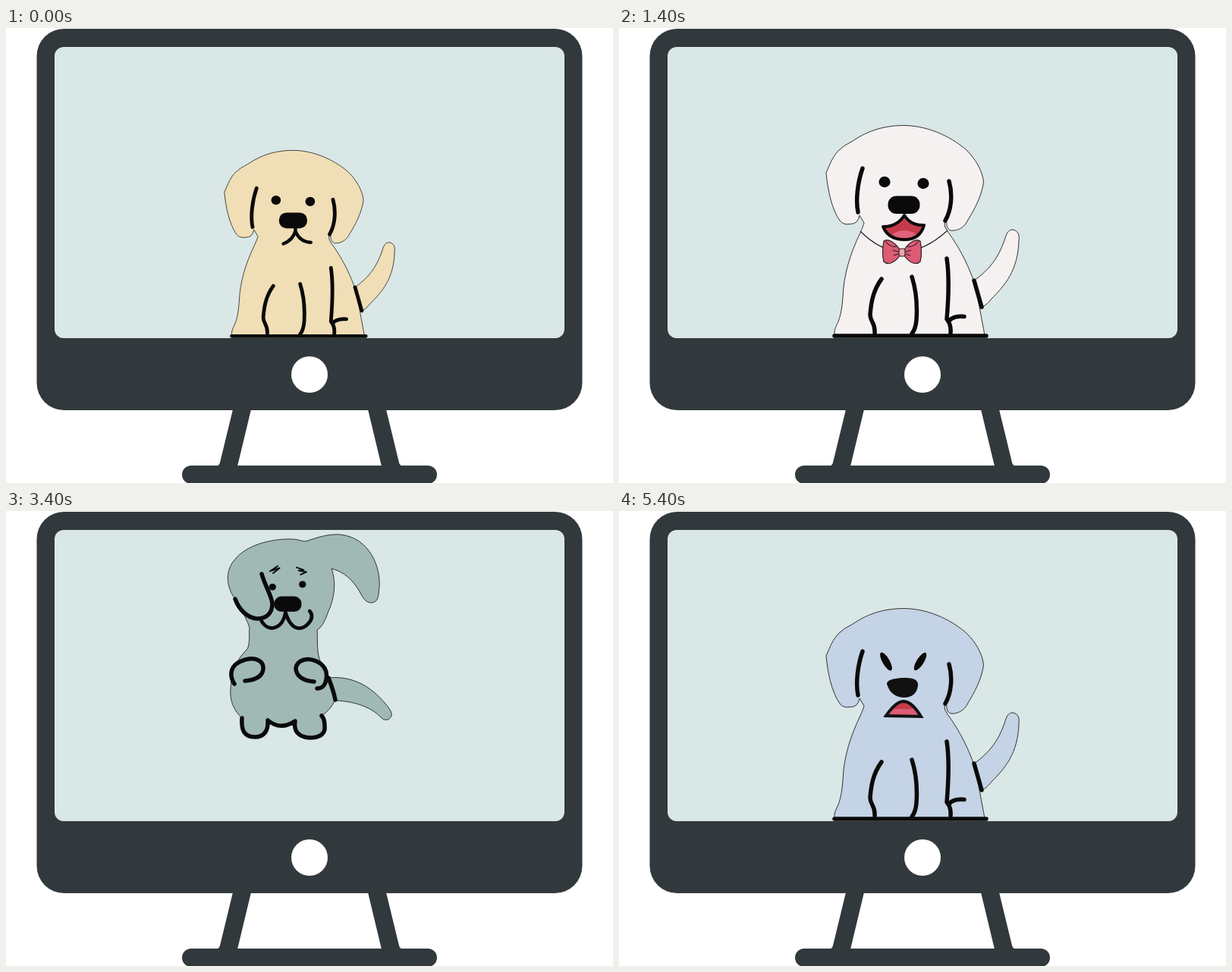
An HTML page for the animation above (5.6 s loop, 800 px wide and 600 px high).

```html
<!DOCTYPE html>
<html>
<head>
<meta charset="utf-8">
<title>Jumping puppies</title>
<style>
html, body { margin: 0; width: 100%; height: 100%; overflow: hidden; background: #fff; }
svg { display: block; width: 800px; height: 600px; }
.skin { stroke: #333; stroke-width: 1; }
.thin { fill: none; stroke: #222; stroke-width: 1.2; }
.thick { fill: none; stroke: #0a0a0a; stroke-width: 5.5; stroke-linecap: round; stroke-linejoin: round; }
</style>
</head>
<body>
<svg viewBox="0 0 800 600">
  <g fill="#32393c">
    <rect x="40.500" y="1" width="719" height="503" rx="36"/>
    <path d="M299 503H323L305 578H277Q281 577 282 573ZM501 503H477L495 578H523Q519 577 518 573Z"/>
    <rect x="232" y="577" width="336" height="24" rx="12"/>
  </g>
  <rect x="64" y="25" width="672" height="384" rx="12" fill="#d9e7e6"/>
  <circle cx="400" cy="457" r="24" fill="#fff"/>
  <g id="dog"></g>
</svg>
<script>
const poses = {
  sit: {
    body: 'M273 191C279 177 282 169 290 161Q296 155 308 149C330 134 352 128.500 376 128.500C412 129 442 147 458 161C470 173 479 188 480.500 203C478 222 468 240 460 253C455 264 445 268 437 267Q431 264 432 257L429 256Q428 262 433 268C452 294 462 318 468 335C474 360 478 385 482 405H284C283 390 292 395 295 355C296 325 305 297 318 270Q322 261 323 257L317 247Q315 259 304 258.500Q296 260 291 254C280 238 275 213 273 191Z',
    tail: 'M468 333C488 319 500 303 508 280C511 269 514 266 519 266C526 267 528 273 527 280C526 320 508 340 491 357Q484 366 478 368Z',
    lines: 'M321 185C314 205 312 228 315 243M435 202C440 220 438 240 430 254M346 331C334 347 332 365 331 378C331 388 338 388 337 402M386 328C393 350 393 370 392 385Q391 397 386 403M432 304C436 330 434 360 432 384Q438 391 437 402M434 387C440 380 448 380 455 380.500M468 333L478 368M284 406H484',
    collar: 'M318 268Q372 322 433 267',
    bow: [373, 296], face: [375, 233, 1], eyes: [[-25, -30], [26, -28]]
  },
  top: {
    body: 'M302 116C290 100 289 80 300 66C316 44 350 37 374 37C385 37 390 40 395 40C410 35 425 30 440 31C480 35 494 75 492 100C491 112 491 120 482 121C475 121 471 116 467 108C457 90 445 80 429 76C436 95 432 117 425 132Q418 153 410 157C411 170 409 188 415 200L425 220L434 249Q428 262 416 270C421 275 420 283 420 288C418 298 408 299 400 299C385 298 379 290 381 277Q362 290 345 276C346 290 340 298 328 298C313 298 310 288 311 273C297 260 295 245 296 235C297 215 300 200 318 182C322 175 320 160 321 154Q318 143 302 116Z',
    tail: 'M425 220C455 217 480 230 500 254C506 261 509 266 508 270C506 276 499 277 495 273C485 262 465 251 434 250Z',
    lines: 'M337 83C342 100 350 112 351 122C351 136 342 142 331 142C318 141 307 130 302 116M301 228C293 215 297 203 310 198C325 191 340 196 339 208C338 219 328 223 315 224M406 225C392 224 382 218 382 207C384 196 397 193 409 198C420 203 424 212 422 222C421 230 416 234 410 234M425 220Q432 238 434 249M416 270C421 275 420 283 420 288C418 298 408 299 400 299C385 298 379 290 381 277Q362 290 345 276C346 290 340 298 328 298C313 298 310 288 311 273',
    collar: 'M321 156Q365 204 411 157',
    bow: [366, 182], face: [371, 122.5, .86], eyes: [[-23, -30], [29, -24]]
  },
  fall: {
    body: 'M320 205C300 195 275 165 273 138C272 110 290 100 300 95C318 87 325 75 345 70C365 66 380 63 395 66C425 70 445 90 460 110C470 123 478 130 488 128C500 125 505 121 515 123C530 126 527 137 522 144C508 162 495 176 475 175Q460 174 447 166C446 185 440 198 434 206Q425 212 409 220L421 229L433 268Q430 280 424 282L420 291C430 291 437 298 433 310C428 322 410 320 396 310Q390 304 389 297C380 292 360 294 350 299Q348 316 337 321C322 326 306 319 307 305Q308 298 313 297C295 285 290 265 295 248Q303 222 321 215Z',
    tail: 'M422 238C455 235 475 233 490 219C497 211 504 212 507 217C508 225 495 240 480 252C465 262 450 267 433 267Z',
    lines: 'M319 138C312 150 313 165 319 178C325 190 322 200 320 205M429 142Q433 158 448 167M422 237Q429 250 433 268M391 270C386 285 386 300 396 310C410 320 428 322 433 310C437 298 430 289 413 291L424 281M349 273C352 290 353 312 337 321C322 326 306 319 307 305C307 297 315 295 323 296L314 285',
    collar: 'M314 223Q365 283 422 228',
    bow: [369, 255], face: [370, 173, 1], eyes: [[-27, -23], [32, -16]]
  }
};

const path = (d, attrs) => `<path d="${d}" ${attrs}/>`;
const ellipse = (x, y, rx, ry, turn = 0) =>
  `<ellipse rx="${rx}" ry="${ry}" transform="translate(${x} ${y}) rotate(${turn})"/>`;
const dots = (eyes, r) => eyes.map(([x, y]) => ellipse(x, y, r, r * .95)).join('');
const ink = w => `fill="none" stroke="#0a0a0a" stroke-width="${w}" stroke-linecap="round" stroke-linejoin="round"`;
const roundNose = '<rect x="-20.500" y="-11.500" width="42" height="23.500" rx="11"/>';

const faces = {
  calm: eyes => dots(eyes, 7.2) + roundNose +
    path('M-14 35Q0 30 4 16Q10 32 27 33M4 10V17', ink(5)),
  happy: eyes => dots(eyes, 7.6) + roundNose +
    path('M-27 29Q-8 29 1 14Q10 28 27 27Q22 46 1 46Q-20 46 -27 29Z', 'fill="#c43b49"') +
    path('M-15 39Q1 29 17 39Q10 45 1 45Q-9 45 -15 39Z', 'fill="#e0627c"') +
    path('M-27 29Q-8 29 1 14Q10 28 27 27Q22 46 1 46Q-20 46 -27 29Z', ink(4)),
  sad: () => dots([[-23, -26], [23, -30]], 5.5) + roundNose +
    path('M-40 26C-30 44 -8 40 -3 13C6 44 24 40 32 30C39 23 38 15 34 11', ink(5.5)) +
    path('M-27 -50L-15 -58L-24 -51L-12 -55L-22 -47M14 -56L25 -52L17 -51L29 -49L20 -45', ink(2.2)),
  angry: () => ellipse(-23, -34.5, 4.7, 13.5, -30) + ellipse(22, -34.5, 4.7, 13.5, 32) +
    path('M-22 -5Q-22 -12 0 -13Q20 -14 19 -3Q17 13 0 13Q-17 12 -22 -5Z', 'fill="#111"') +
    path('M-23 37Q-10 18 0 18Q11 18 23 38Z', 'fill="#c43b49"') +
    path('M-15 28H14L22 37H-22Z', 'fill="#dd5b74"') +
    path('M-23 37Q-10 18 0 18Q11 18 23 38Z', 'fill="none" stroke="#111" stroke-width="4"')
};

const bowHalf = path('M3 -4C10 -14 19 -19 24 -15Q27 0 24 12C18 18 8 12 3 4Z', 'fill="#dd5b74"') +
  path('M7 -8Q15 -6 22 -15M5 -1L12 -3M5 2L11 4', 'fill="none"');
const bow = ([x, y]) => `<g transform="translate(${x} ${y})" stroke="#222" stroke-width="1.200">
  ${bowHalf}<g transform="scale(-1 1)">${bowHalf}</g>
  <rect x="-4" y="-5" width="8" height="10" rx="2" fill="#eba3b0"/></g>`;

const dogs = [
  { skin: '#f0deb6', face: 'calm', size: .883, shift: [31, 1] },
  { skin: '#f5f1f1', face: 'happy', bow: true },
  { skin: '#a0b9b5', face: 'sad' },
  { skin: '#c4d3e5', face: 'angry' }
];

// Each step: pose, horizontal stretch, vertical stretch, drop
const jump = [
  ['sit', 1, 1, 0],
  ['sit', 1.13, .85, 0],
  ['sit', .92, 1.1, -30],
  ['top', 1, 1, 0],
  ['fall', 1, 1, 0],
  ['fall', 1, 1, 80],
  ['sit', 1, 1, 0]
];

function drawDog({ skin, face, bow: hasBow, size = 1, shift = [0, 0] }, [name, sx, sy, drop]) {
  const pose = poses[name], [x, y, scale] = pose.face;
  const place = name === 'sit'
    ? `translate(400 ${409 + drop}) scale(${sx * size} ${sy * size}) translate(-400 -409)`
    : `translate(${shift[0]} ${shift[1] + drop})`;
  return `<g transform="${place}">` +
    path(pose.tail, `class="skin" fill="${skin}"`) +
    path(pose.body, `class="skin" fill="${skin}"`) +
    path(pose.lines, 'class="thick"') +
    (hasBow ? path(pose.collar, 'class="thin"') + bow(pose.bow) : '') +
    `<g transform="translate(${x} ${y}) scale(${scale})" fill="#0a0a0a">${faces[face](pose.eyes)}</g></g>`;
}

const stage = document.getElementById('dog');
const start = performance.now();
let shown = -1;
function tick() {
  const step = Math.floor((performance.now() - start) % 5600 / 200);
  if (step !== shown) {
    shown = step;
    stage.innerHTML = drawDog(dogs[Math.floor(step / 7)], jump[step % 7]);
  }
  requestAnimationFrame(tick);
}
tick();
</script>
</body>
</html>
```
